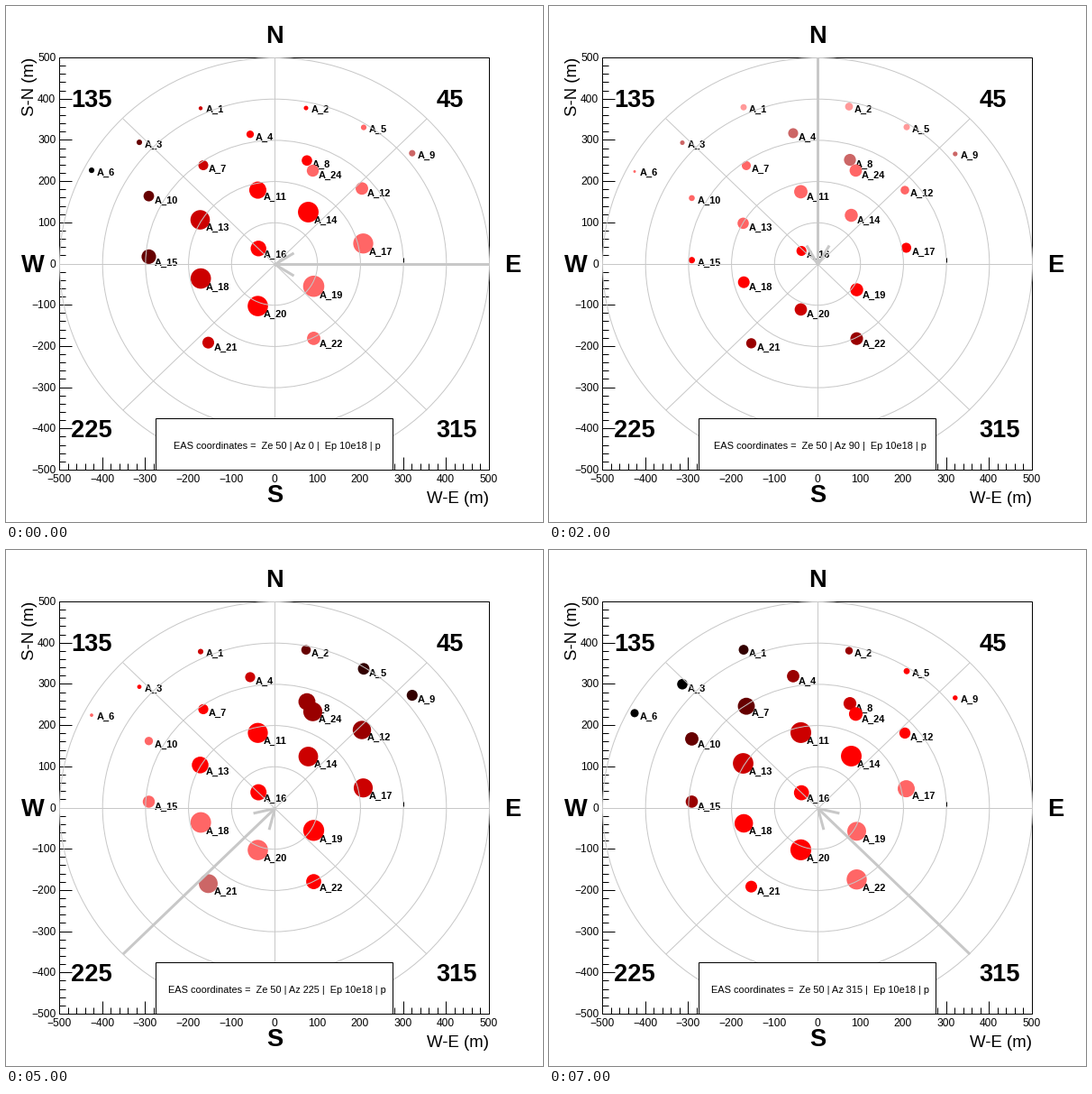
Recreate the animation shown at these times as a matplotlib script. Size 596 by 572 pixels, loop 8000 ms.

```python
import numpy as np
import matplotlib.pyplot as plt
from matplotlib.animation import FuncAnimation
from matplotlib.patches import Circle, Ellipse, Rectangle

W, H, DPI = 596, 572, 100
PX = 72 / DPI                                           # one pixel in points
LEFT, RIGHT, TOP, BOTTOM = 59, 536, 57, 514
KX, KY = (RIGHT - LEFT) / 1000, (BOTTOM - TOP) / 1000   # pixels per metre
MIDX, MIDY = (LEFT + RIGHT) / 2, (TOP + BOTTOM) / 2
CORE_X, CORE_Y = 298, 286
GREY = "#c8c8c8"
ZENITH = np.radians(50)

# where each station stands, in pixels
STATIONS = {
    1: (215.5, 115), 2: (332.5, 115), 3: (147.5, 153.5), 4: (270.5, 145.5),
    5: (396.5, 137), 6: (94.5, 184.5), 7: (218.5, 181), 8: (333.5, 176),
    9: (450.3, 166), 10: (158, 215.5), 11: (279, 212), 12: (394.5, 208),
    13: (215, 246), 14: (335, 238), 15: (158, 284.5), 16: (279.7, 276),
    17: (396, 272.5), 18: (215.7, 311.5), 19: (341, 320.5), 20: (279, 342),
    21: (224, 378.5), 22: (341, 374.5), 24: (340, 188),
}

# arrival time steps, late to early, and their colours
LIMITS = np.r_[-112 - 82.5 * np.arange(4, -1, -1), 78 + 75 * np.arange(5)]
SHADES = [(0.2 * k, 0, 0) for k in range(6)] + [
    "#ff6666", "#ff6666", "#cc6666", "#ff9999", "#cc9999"]

fig = plt.figure(figsize=(W / DPI, H / DPI), dpi=DPI, facecolor="white")
ax = fig.add_axes([0, 0, 1, 1])
ax.set_xlim(-0.5, W - 0.5)
ax.set_ylim(H - 0.5, -0.5)
ax.axis("off")


def line(xs, ys, color="black", width=1, z=1):
    return ax.plot(xs, ys, color=color, lw=width * PX, zorder=z, snap=False,
                   solid_capstyle="butt")[0]


def text(x, y, s, px, ha="center", z=8, **kw):
    return ax.text(x - 0.7, y - 0.7, s, fontsize=px * PX, ha=ha, zorder=z,
                   va="baseline", family="Liberation Sans", **kw)


def box(x0, y0, x1, y1, face, z):
    ax.add_patch(Rectangle((x0, y0), x1 - x0, y1 - y0, fc=face, ec="black",
                           lw=PX, snap=False, zorder=z))


def draw_axes():
    box(LEFT, TOP, RIGHT, BOTTOM, "none", 1)
    for m in range(-500, 501, 20):
        size = 7 if m % 100 else 14
        x, y = round(MIDX + m * KX), round(MIDY - m * KY)
        line([x, x], [BOTTOM, BOTTOM - size])
        line([LEFT, LEFT + size], [y, y])
        if m % 100 == 0:
            name = str(m).replace("-", "\u2212")
            text(x, 528.5, name, 12)
            text(55.5, y + 4.5, name, 12, ha="right")
    text(536.5, 551, "W-E (m)", 18.7, ha="right")
    text(31, 57, "S-N (m)", 18.7, ha="right", rotation=90,
         rotation_mode="anchor")


def draw_compass():
    for k in range(1, 6):
        ax.add_patch(Ellipse((MIDX, MIDY), 200 * k * KX, 200 * k * KY,
                             fill=False, ec=GREY, lw=PX, zorder=4))
    for a in np.radians(range(0, 180, 45)):
        dx, dy = 500 * KX * np.cos(a), 500 * KY * np.sin(a)
        line([CORE_X - dx, CORE_X + dx], [CORE_Y + dy, CORE_Y - dy], GREY, z=4)
    marks = [("N", 298.5, 41), ("S", 298.5, 550.5), ("W", 30, 295.5),
             ("E", 562.5, 295.5), ("45", 493.5, 112.5), ("135", 95, 112.5),
             ("225", 95, 478.5), ("315", 500.5, 478.5)]
    for s, x, y in marks:
        text(x, y, s, 27.3, weight="bold")


def metres(x, y):
    return (x - CORE_X) / KX, (CORE_Y - y) / KY


def shade(x, y, a):
    east, north = metres(x, y)
    early = east * np.cos(a) + north * np.sin(a)
    early -= (east ** 2 + north ** 2) / 10000      # curved shower front
    return SHADES[int(np.searchsorted(LIMITS, early))]


def radius(x, y, a):
    """Signal by distance to the shower axis, strongest on a ring."""
    east, north = metres(x, y)
    along = east * np.cos(a) + north * np.sin(a)
    across = north * np.cos(a) - east * np.sin(a)
    dist = np.hypot(along * np.cos(ZENITH), across)
    dist *= 1 + 0.17 * np.cos(a) ** 4              # narrower from east, west
    gain = 1 - 0.37 * max(0, np.sin(a)) ** 3       # weaker from the north
    return gain * np.interp(dist, [0, 110, 160, 230, 300, 470],
                            [7, 11.8, 11.1, 7.6, 5.4, 1.9])


def draw_arrow(a):
    dx, dy = 500 * KX * np.cos(a), -500 * KY * np.sin(a)
    shaft.set_data([CORE_X + dx, CORE_X], [CORE_Y + dy, CORE_Y])
    sides = np.arctan2(dy, dx) + np.radians([-31, 31])
    px, py = CORE_X + 24.5 * np.cos(sides), CORE_Y + 24.5 * np.sin(sides)
    head.set_data([px[0], CORE_X, px[1]], [py[0], CORE_Y, py[1]])


draw_axes()
draw_compass()
line([441, 441], [279, 284], z=5)

discs = []
for n, (x, y) in STATIONS.items():
    text(x + 6.5, y + 3.2, f"A_{n}", 11, ha="left", z=2, weight="bold")
    discs.append(ax.add_patch(Circle((x, y), 1, lw=0, zorder=3)))

shaft, head = (line([], [], GREY, 3, z=6) for _ in range(2))
box(166, 457, 429, BOTTOM, "white", 7)
caption = text(301, 491, "", 11)


def update(i):
    az = 45 * i
    a = np.radians(az)
    for disc, (x, y) in zip(discs, STATIONS.values()):
        r = radius(x, y, a)
        disc.center = (x, y - 0.3 - 0.85 * r)
        disc.set_radius(r)
        disc.set_facecolor(shade(x, y, a))
    draw_arrow(a)
    caption.set_text(f"EAS coordinates =  Ze 50 | Az {az} |  Ep 10e18 | p")
    return [*discs, shaft, head, caption]


anim = FuncAnimation(fig, update, frames=8, interval=1000, repeat=True,
                     repeat_delay=0, blit=False)
plt.show()
```
